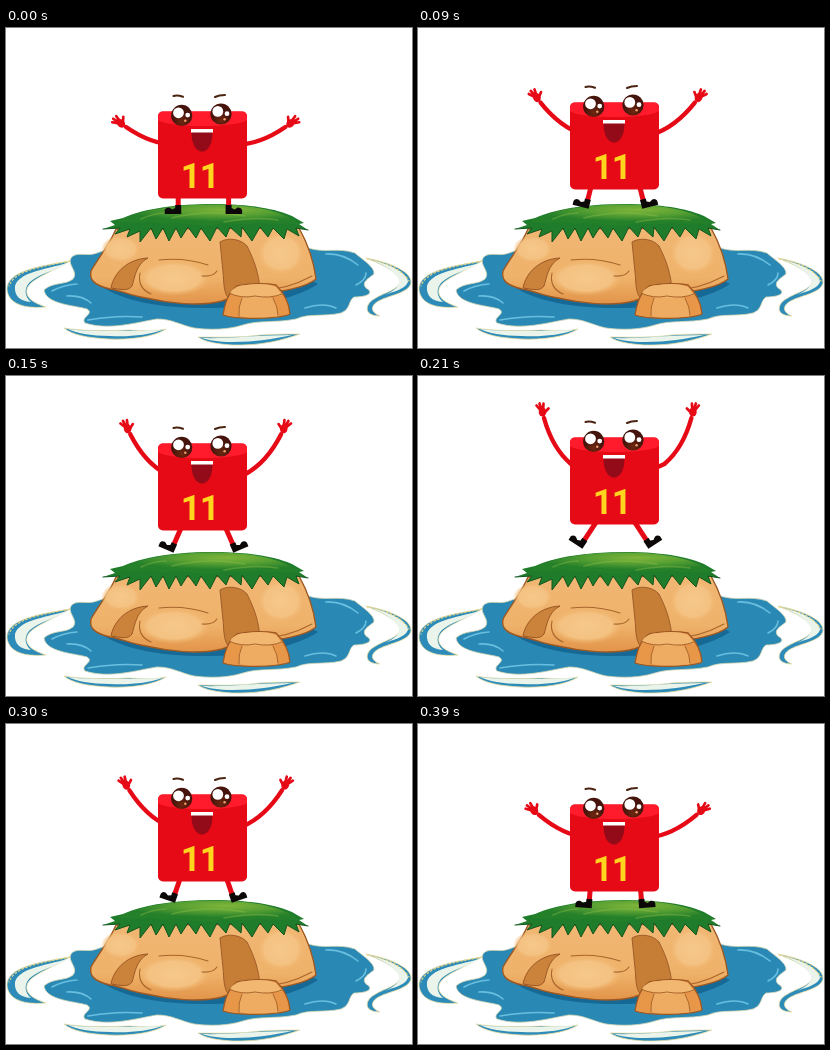
Write an HTML page that moves like this. It is 406 by 320 pixels and loops after 0.42 s.

```html
<!DOCTYPE html>
<html lang="en">
<head>
<meta charset="utf-8">
<title>Jumping block</title>
<style>
html, body { margin: 0; width: 100%; height: 100%; overflow: hidden; background: #fff; }
svg { display: block; width: 406px; height: 320px; }
text { font: 700 35px Roboto, Inter, sans-serif; fill: #ffd51e; }
.line { fill: none; stroke-linecap: round; stroke-linejoin: round; }
</style>
</head>
<body>
<svg viewBox="0 0 406 320">
  <defs>
    <radialGradient id="grass" cx="0.6" cy="0.25" r="0.55">
      <stop offset="0" stop-color="#7fb53a"/>
      <stop offset="0.5" stop-color="#57a033"/>
      <stop offset="1" stop-color="#25802a"/>
    </radialGradient>
    <linearGradient id="rock" x1="0" x2="0" y1="0" y2="1">
      <stop offset="0" stop-color="#f0b673"/>
      <stop offset="0.65" stop-color="#efb26a"/>
      <stop offset="1" stop-color="#e29449"/>
    </linearGradient>
    <radialGradient id="shine">
      <stop offset="0" stop-color="#f5c88a"/>
      <stop offset="0.7" stop-color="#f4c282"/>
      <stop offset="1" stop-color="#f0b46c" stop-opacity="0"/>
    </radialGradient>
    <radialGradient id="iris" cy="0.8">
      <stop offset="0" stop-color="#6e2710"/>
      <stop offset="0.9" stop-color="#45140c"/>
    </radialGradient>
    <g id="eye">
      <circle r="10.6" fill="url(#iris)"/>
      <circle cx="-3.2" cy="-2.6" r="5.4" fill="#fff"/>
      <circle cx="6" cy="-0.3" r="2.4" fill="#fff"/>
      <circle cx="3.6" cy="5.3" r="1.2" fill="#f0a070"/>
    </g>
    <g id="arm" class="line" stroke="#e60a17">
      <path d="M0 0C5 18 14 35 27 46L38 51" stroke-width="4.4"/>
      <ellipse cx="-1.5" cy="-6" rx="3.8" ry="4.6" fill="#e60a17" stroke="none"/>
      <path d="M-2 -6L-7.500 -12.500M-2 -7L-4.500 -14.500M-1 -7L-0.500 -14.500M0 -5L4.500 -9.500" stroke-width="2.7"/>
    </g>
    <g id="leg">
      <path d="M0 2V-22" stroke="#e60a17" stroke-width="5"/>
      <path d="M-3 0H3V9H-13.500V5Q-12.500 2 -9 2.500L-6 4.500L-3 3Z" fill="#0c0808"/>
    </g>
  </defs>

  <g id="water">
    <g fill="#2c8bb8" stroke="#eadfa6" stroke-width="0.8">
      <path d="M64 233C34 238 0 243 1 262C3 276 18 281 40 279C28 275 19 270 21 261C24 251 44 245 64 233Z"/>
      <path d="M360 230C386 235 406 244 405 255C402 266 382 267 371 274C365 278 364 284 374 288C357 288 359 276 368 271C379 264 392 262 394 254C394 245 377 237 360 230Z"/>
      <path d="M58 300C75 303 101 303 124 302C140 303 151 303 160 301C148 309 124 312 103 311C82 310 66 307 58 300Z"/>
      <path d="M192 309C210 309 233 310 254 307C268 306 280 306 294 306C277 312 255 318 226 317C211 316 199 314 192 309Z"/>
    </g>
    <g fill="#eaf4ea">
      <path d="M62 235C35 242 13 245 9 258C8 268 14 273 25 274C18 268 18 260 24 254C33 246 48 243 62 235Z"/>
      <path d="M363 231C386 237 402 245 402 254C399 262 385 264 379 267C389 262 394 258 393 252C389 243 376 236 363 231Z"/>
      <path d="M62 301C80 304 130 303 156 302C143 307 124 309 104 308C84 308 70 305 62 301Z"/>
      <path d="M196 310C220 311 250 307 286 307C267 311 250 314 227 314C212 314 202 312 196 310Z"/>
    </g>
    <path class="line" d="M64 233C35 239 9 242 3 258M361 231Q392 236 403 253" stroke="#e6d383" stroke-width="1.2" stroke-dasharray="1.500 2.500"/>
    <path d="M38 262C46 254 60 257 67 251C73 244 61 237 65 230C70 223 81 229 91 225C100 221 112 220 130 219H300C316 226 332 219 349 225C357 232 369 239 368 246C362 251 355 254 360 260C369 265 361 269 348 269C342 273 345 281 335 285C318 289 303 285 290 291C270 295 252 292 237 297C221 302 204 302 188 300C174 297 166 291 151 291C132 294 103 303 79 295C74 289 89 286 81 281C66 277 40 276 38 262Z" fill="#2a88b5" stroke="#d6d9b4" stroke-width="0.8"/>
    <path d="M92 256C112 271 146 279 190 280C240 281 286 273 312 256L296 247L150 260Z" fill="#176995"/>
    <path class="line" d="M46 263Q57 257 71 256M61 268Q76 267 85 275M82 292Q110 287 136 289M320 226Q337 225 352 237M360 245Q360 252 350 257M299 280Q318 274 330 280" stroke="#68bfdf" stroke-width="1.6"/>
  </g>

  <g stroke-linejoin="round">
    <path d="M110 201C104 216 91 232 85 243C83 252 88 257 104 261C117 263 125 268 140 270C161 275 194 279 216 273C229 268 240 266 254 264C274 265 301 259 310 251C308 235 302 216 293 200Z" fill="url(#rock)" stroke="#9c5823" stroke-width="1.4"/>
    <ellipse cx="168" cy="250" rx="37" ry="18" fill="url(#shine)"/>
    <ellipse cx="275" cy="225" rx="24" ry="22" fill="url(#shine)"/>
    <ellipse cx="115" cy="221" rx="20" ry="14" fill="url(#shine)"/>
    <path d="M105 260C108 244 122 231 142 230C130 236 129 249 126 258C122 264 113 261 105 260Z" fill="#cb833c" stroke="#9c5823" stroke-width="1"/>
    <path d="M214 214C222 209 235 211 241 218C248 232 253 245 254 263L224 271C217 267 218 252 217 244Z" fill="#c67e37" stroke="#a05d27" stroke-width="1"/>
    <path class="line" d="M153 232Q178 229 202 237M134 245Q131 260 145 266M196 248Q207 249 211 243M255 262Q280 262 306 248" stroke="#a9662c" stroke-width="1.1"/>
    <path d="M217 287C219 276 221 266 231 258C243 255 260 255 270 257C277 264 283 273 284 286C274 291 231 292 217 287Z" fill="#e89749" stroke="#9c5823" stroke-width="1.3"/>
    <path d="M236 269Q250 268 267 270Q272 279 272 288Q250 291 233 288Q232 279 236 269Z" fill="#eeac63"/>
    <path d="M224 265Q229 257 240 257Q259 254 270 259L276 267Q257 271 242 269Q231 269 224 265Z" fill="#f2b872"/>
    <path class="line" d="M223 265Q235 271 249 268Q264 271 276 266M236 270Q232 279 233 288M267 270Q272 279 272 287" stroke="#a9662c" stroke-width="1"/>
  </g>

  <g>
    <path d="M97 201L109 197L104 193L117 190C139 180 174 176 206 176C245 176 270 181 286 188L298 195L293 196L302 202L290 200L293 208L281 201L278 211L267 200L262 209L254 199L246 213L236 199L235 209L224 199L220 209L211 199L204 213L195 200L190 210L182 199L175 210L170 200L163 213L157 200L150 211L145 200L134 214L134 203L121 209L124 201L109 206L114 200Z" fill="#1f7c2a"/>
    <path class="line" d="M302 202L290 200L293 208L281 201L278 211L267 200L262 209L254 199L246 213L236 199L235 209L224 199L220 209L211 199L204 213L195 200L190 210L182 199L175 210L170 200L163 213L157 200L150 211L145 200L134 214L134 203L121 209L124 201L109 206L114 200L97 201" stroke="#14541f" stroke-width="1"/>
    <path d="M112 193C139 180 174 176.500 206 176.500C245 176.500 276 182 293 196C276 194 267 198 253 194C237 199 225 193 207 197C190 200 178 192 158 196C141 191 129 198 112 193Z" fill="url(#grass)"/>
    <path class="line" d="M166 190Q201 181 239 188M218 194Q249 188 272 192M135 191Q148 185 160 185" stroke="#9cc24a" stroke-width="1.5" opacity="0.35"/>
  </g>

  <use id="armL" href="#arm"/>
  <use id="armR" href="#arm"/>
  <use id="legL" href="#leg"/>
  <use id="legR" href="#leg"/>

  <g id="body">
    <rect x="152" y="83.500" width="89" height="87" rx="5" fill="#e60a17"/>
    <path d="M152 92V88.500Q152 83.500 157 83.500H236Q241 83.500 241 88.500V92C230 100 163 100 152 92Z" fill="#ff1b2b"/>
    <use href="#eye" x="175.700" y="87.400"/>
    <use href="#eye" x="215" y="86"/>
    <path class="line" d="M167.500 68Q171 66.500 177 68.800M209 69Q213 67 219 67" stroke="#4a2311" stroke-width="2"/>
    <path d="M185.500 102H206.500C207 116 202 123.500 196 123.500C190 123.500 185 116 185.500 102Z" fill="#930a18"/>
    <path d="M185 101H207V104.500H185Z" fill="#fff"/>
    <text x="174.700 193.700" y="160">11</text>
  </g>
</svg>
<script>
const STEP = 30, STEPS = 14, HALF = STEPS / 2;
const byId = id => document.getElementById(id);
const mix = (a, b, u) => a + (b - a) * u;
const place = (id, value) => byId(id).setAttribute("transform", value);

// Each limb and its mirror image share one pose; width is twice the mirror axis.
function limb(name, width, x, y, angle) {
  const pose = `translate(${x} ${y}) rotate(${angle})`;
  place(name + "L", pose);
  place(name + "R", `translate(${width} 0) scale(-1 1) ${pose}`);
}

function draw(time) {
  const step = Math.floor(time / STEP) % STEPS;
  const lift = 1 - Math.abs(step - HALF) / HALF;
  place("body", `translate(0 ${-Math.round(22 * lift)})`);
  limb("arm", 399.4, mix(120, 126, lift), mix(99, 42, lift), mix(-40, 0, lift));
  limb("leg", 394.8, mix(172.2, 166.8, lift), mix(177, 163.5, lift), mix(0, 33, lift));
}

const start = performance.now();
function tick() {
  draw(performance.now() - start);
  requestAnimationFrame(tick);
}
draw(0);
tick();
</script>
</body>
</html>
```
